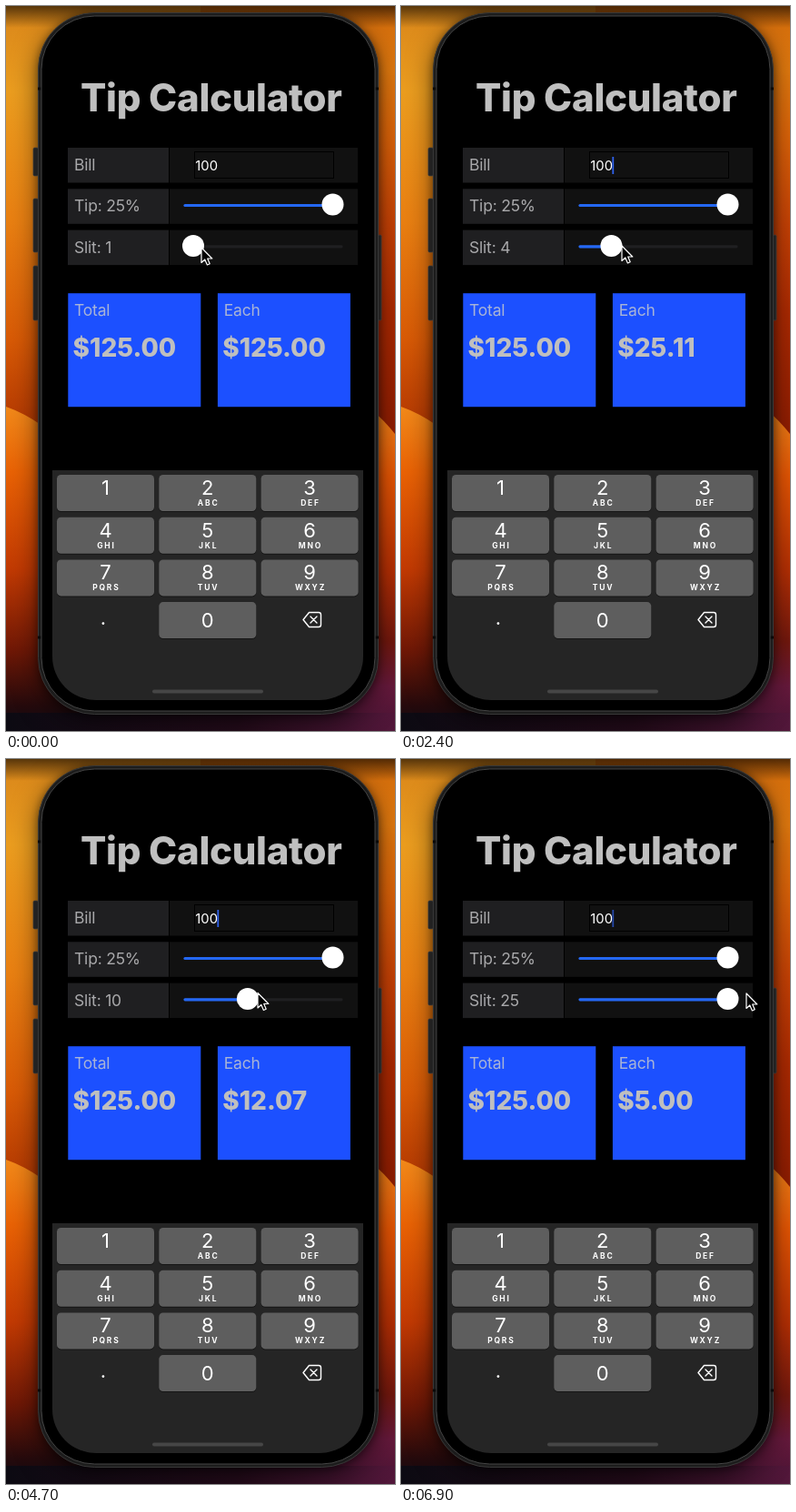
An HTML page for the animation above (7 s loop, 428 by 798 pixels).

```html
<!DOCTYPE html>
<html lang="en">
<head>
<meta charset="utf-8">
<title>Tip Calculator</title>
<style>
  html, body { margin: 0; width: 100%; height: 100%; overflow: hidden; background: #000; }
  svg { display: block; width: 428px; height: 798px; font-family: Inter, "Open Sans", sans-serif; }
  .title { font-size: 42px; font-weight: 800; letter-spacing: -.3px; fill: #bfbfbf; }
  .label { font-size: 17.5px; letter-spacing: -.2px; fill: #a9a9ab; }
  .box .label { fill: #a9b4d6; }
  .money { font-size: 28px; font-weight: 800; fill: #bfbfbf; }
  .field { font-size: 14.8px; fill: #fff; }
  .digit { font-size: 22px; fill: #fff; text-anchor: middle; }
  .abc { font-size: 8.5px; font-weight: 700; letter-spacing: 1.8px; fill: #fff; text-anchor: middle; }
  .track { stroke-width: 3.2; stroke-linecap: round; stroke: #1f1f21; }
  .fill { stroke: #2468f5; }
  .thumb { fill: #fff; }
  .body { filter: drop-shadow(0 2px 5px rgba(0, 0, 0, .45)) drop-shadow(0 8px 14px rgba(0, 0, 0, .5)); }
</style>
</head>
<body>
<svg viewBox="0 0 428 798">
  <defs>
    <linearGradient id="leftTop" x2="0" y2="1">
      <stop offset="0" stop-color="#d8851a"/>
      <stop offset=".2" stop-color="#eb9d1f"/>
      <stop offset=".5" stop-color="#e98012"/>
      <stop offset=".78" stop-color="#d85a06"/>
      <stop offset="1" stop-color="#b03502"/>
    </linearGradient>
    <linearGradient id="leftLow" x2="0" y2="1">
      <stop offset="0" stop-color="#f28a1a"/>
      <stop offset=".2" stop-color="#e96205"/>
      <stop offset=".5" stop-color="#c23a03"/>
      <stop offset=".75" stop-color="#701806"/>
      <stop offset=".92" stop-color="#260a0c"/>
      <stop offset="1" stop-color="#0e0a12"/>
    </linearGradient>
    <linearGradient id="rightTop" x2="0" y2="1">
      <stop offset="0" stop-color="#cf6a0c"/>
      <stop offset=".15" stop-color="#e27a0f"/>
      <stop offset=".3" stop-color="#dd6409"/>
      <stop offset=".5" stop-color="#c84205"/>
      <stop offset=".7" stop-color="#ad2a02"/>
      <stop offset="1" stop-color="#8e1c02"/>
    </linearGradient>
    <linearGradient id="rightLow" x2="0" y2="1">
      <stop offset="0" stop-color="#f18218"/>
      <stop offset=".2" stop-color="#e65604"/>
      <stop offset=".5" stop-color="#b52f04"/>
      <stop offset=".72" stop-color="#74180e"/>
      <stop offset=".86" stop-color="#66193c"/>
      <stop offset="1" stop-color="#481434"/>
    </linearGradient>
    <linearGradient id="floor">
      <stop offset="0" stop-color="#0c0a12"/>
      <stop offset=".6" stop-color="#240b1a"/>
      <stop offset="1" stop-color="#52173a"/>
    </linearGradient>
    <linearGradient id="topShade" x2="0" y2="1">
      <stop offset="0" stop-opacity=".6"/>
      <stop offset="1" stop-opacity="0"/>
    </linearGradient>
  </defs>

  <rect width="214" height="470" fill="url(#leftTop)"/>
  <rect x="214" width="214" height="480" fill="url(#rightTop)"/>
  <path d="M0 441 Q20 448 40 462 H214 V798 H0Z" fill="url(#leftLow)"/>
  <path d="M404 446 Q416 456 428 471 V798 H214 V446Z" fill="url(#rightLow)"/>
  <rect y="778" width="428" height="20" fill="url(#floor)"/>
  <rect width="428" height="24" fill="url(#topShade)"/>

  <rect class="body" x="35.5" y="7.5" width="374" height="772" rx="62" fill="#1c1c1c" stroke="#383838"/>
  <g fill="#222" stroke="#3d3d3d" stroke-width=".7">
    <rect x="30" y="156" width="5.5" height="31" rx="1.5"/>
    <rect x="30" y="212" width="5.5" height="59" rx="1.5"/>
    <rect x="30" y="286" width="5.5" height="60" rx="1.5"/>
    <rect x="409.5" y="252" width="3.5" height="94" rx="1.5"/>
  </g>
  <path d="M35 91H40M405 91H410M35 695H40M405 695H410" stroke="#0a0a0a" stroke-width="3"/>
  <rect x="39" y="11" width="367" height="765" rx="58.5" stroke="#454545"/>

  <text class="title" x="82" y="116">Tip Calculator</text>

  <g id="rows"></g>
  <rect x="207.5" y="160.5" width="153" height="29" fill="#111" stroke="#000"/>
  <text class="field" x="208.3" y="181">100</text>
  <rect id="caret" x="232.4" y="166" width="1.8" height="19" fill="#2f62ee"/>
  <g id="sliders"></g>
  <g id="boxes"></g>

  <path d="M51 511H393V716A48 48 0 0 1 345 764H99A48 48 0 0 1 51 716Z" fill="#252525"/>
  <g id="keys"></g>
  <g fill="none" stroke="#fff" stroke-width="1.4" stroke-linejoin="round" stroke-linecap="round">
    <path d="M333.5 667.5H344a2.5 2.5 0 0 1 2.5 2.5V681a2.5 2.5 0 0 1-2.5 2.5H333.5L327 675.5Z"/>
    <path d="M335 672l7 7M342 672l-7 7"/>
  </g>
  <rect x="161" y="752.5" width="122" height="4" rx="2" fill="#464646"/>

  <path id="cursor" d="M0 0V16.5L3.8 13 6.4 19 9.2 17.8 6.7 12H11.8Z" fill="#000" stroke="#fff" stroke-width="1.2" stroke-linejoin="round"/>
</svg>

<script>
const $ = id => document.getElementById(id);
const LOOP = 7000, STEP = 100, TOTAL = 125;
const MIN_X = 206, MAX_X = 359.5, MAX_SPLIT = 25;

const rect = (x, y, w, h, fill) => `<rect x="${x}" y="${y}" width="${w}" height="${h}" fill="${fill}"/>`;
const text = (cls, x, y, str, id = '') => `<text class="${cls}" x="${x}" y="${y}" id="${id}">${str}</text>`;

$('rows').innerHTML = ['Bill', 'Tip: 25%', 'Slit: 1'].map((str, i) => {
  const y = 156 + i * 45.3;
  return rect(68, y, 111, 38.5, '#1f1f21') + rect(180, y, 207, 38.5, '#111') +
    text('label', 75, y + 25, str, 'label' + i);
}).join('');

const slider = (name, y, x) =>
  `<path class="track" d="M197 ${y}H369"/>
   <line class="track fill" id="${name}Fill" x1="197" x2="${x}" y1="${y}" y2="${y}"/>
   <circle class="thumb" id="${name}Thumb" cx="${x}" cy="${y - .9}" r="12"/>`;
$('sliders').innerHTML = slider('tip', 219.5, MAX_X) + slider('split', 264.8, MIN_X);

$('boxes').innerHTML = [['Total', 68.3], ['Each', 232.9]].map(([name, x]) =>
  `<g class="box">${rect(x, 316.2, 146, 125, '#1c50ff')}${text('label', x + 6.8, 341, name)}${
    text('money', x + 5.3, 385.6, '$125.00', name)}</g>`).join('');

const letters = ['', 'ABC', 'DEF', 'GHI', 'JKL', 'MNO', 'PQRS', 'TUV', 'WXYZ'];
const key = (col, row, digit, sub) => {
  const x = 56 + col * 112.3, y = 516 + row * 46.7, mid = x + 53.5;
  const cap = (top, fill) => `<rect x="${x}" y="${top}" width="107" height="40" rx="4.5" fill="${fill}"/>`;
  return cap(y + 1, '#151515') + cap(y, '#5e5e5e') +
    text('digit', mid, y + (row < 3 ? 22 : 27.5), digit) + text('abc', mid + .9, y + 34, sub);
};
$('keys').innerHTML = letters.map((sub, i) => key(i % 3, Math.floor(i / 3), i + 1, sub)).join('') +
  key(1, 3, 0, '') + text('digit', 107, 681, '.');

// Drag path: time, split value (past the end is clamped), pointer x and y
const drag = [
  [0, 1, 215, 266],
  [1600, 2.75, 227, 267],
  [2400, 4.978, 243, 264],
  [3400, 6.975, 254, 261],
  [4200, 5.75, 247, 263],
  [5200, 16.846, 319, 252],
  [6900, 26.5, 380, 258]
];

const rise = (i, c) => (drag[i + 1][c] - drag[i][c]) / (drag[i + 1][0] - drag[i][0]);
const slope = (i, c) => {
  if (i === 0 || i === drag.length - 1) return 0;
  const a = rise(i - 1, c), b = rise(i, c);
  return a * b > 0 ? 2 * a * b / (a + b) : 0;
};

// Monotone cubic through the drag points
function sample(t, c) {
  let i = 0;
  while (i < drag.length - 2 && t >= drag[i + 1][0]) i++;
  const p = drag[i], q = drag[i + 1], h = q[0] - p[0];
  const u = Math.min((t - p[0]) / h, 1), v = 1 - u;
  return p[c] * (1 + 2 * u) * v * v + q[c] * u * u * (3 - 2 * u) +
    h * (slope(i, c) * u * v * v - slope(i + 1, c) * u * u * v);
}

function caretAlpha(t) {
  const phase = t % 1000, ramp = x => Math.max(0, Math.min(1, x));
  return ramp((phase - 250) / 150) * ramp((970 - phase) / 100);
}

function draw(now) {
  const t = Math.floor(now % LOOP / STEP) * STEP;
  const split = Math.max(1, Math.min(MAX_SPLIT, sample(t, 1)));
  const x = MIN_X + (split - 1) / (MAX_SPLIT - 1) * (MAX_X - MIN_X);
  $('splitThumb').setAttribute('cx', x);
  $('splitFill').setAttribute('x2', x);
  $('label2').textContent = 'Slit: ' + Math.floor(split);
  $('Each').textContent = '$' + (TOTAL / split).toFixed(2);
  $('caret').setAttribute('opacity', caretAlpha(t));
  $('cursor').setAttribute('transform', `translate(${sample(t, 2)} ${sample(t, 3)})`);
}

const start = performance.now();
function tick() {
  draw(performance.now() - start);
  requestAnimationFrame(tick);
}
tick();
</script>
</body>
</html>
```
